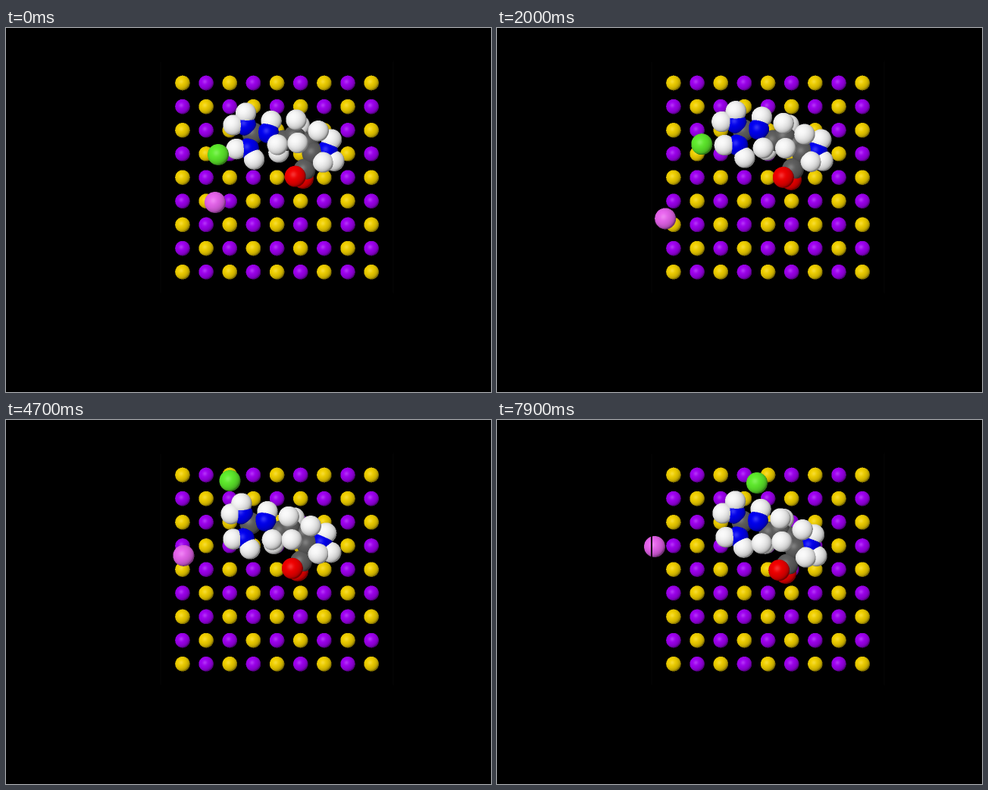
Animation, 640 px wide and 480 px high, one loop 8000 ms. Source, as a matplotlib script:

```python
import numpy as np
import matplotlib.pyplot as plt
from matplotlib.animation import FuncAnimation

W, H, SS = 640, 480, 2
FRAMES, STEP = 80, 100
LEFT, TOP, RIGHT, BOTTOM = 203, 43, 510, 349    # periodic cell
BOND = 16

COLORS = {
    "H": (255, 255, 255), "C": (98, 98, 98), "N": (0, 0, 250),
    "O": (250, 0, 0), "Cl": (98, 245, 46), "Na": (240, 104, 246),
    "gold": (250, 216, 0), "purple": (165, 0, 250),
}
RADIUS = {"H": 13.7, "C": 14.5, "gold": 9.8, "purple": 9.8}

LIGHT = np.array([-1, -1, 2.5]) / np.sqrt(8.25)
HALF = LIGHT + [0, 0, 1]
HALF = HALF / np.linalg.norm(HALF)

# Heavy atoms: name -> x, y, depth; the first letter is the element
HEAVY = {
    "N1": (314, 125, 0), "C1": (324, 136, -7), "N2": (344, 135, 0),
    "N3": (318, 156, 0), "C2": (363, 148, -4), "C3": (377, 143, -2),
    "C4": (394, 152, -6), "C5": (401, 166, 0), "N4": (420, 163, -2),
    "C6": (390, 188, 0), "O1": (378, 196, 12), "O2": (388, 199, -6),
}
# Hydrogens on each heavy atom: bond angle in degrees, depth
HYDROGENS = {
    "N1": [(-88, 3), (180, 3)], "N2": [(-75, -4)],
    "N3": [(178, 3), (62, 4)], "C2": [(132, 14), (112, -8)],
    "C3": [(-90, 10), (-65, -10)], "C4": [(160, 15), (-40, 7)],
    "N4": [(-70, -3), (56, 0), (110, 9)],
}

# Key poses: how far the head, the chain hydrogens and the tail have drifted
KEYS = np.array([0, 1300, 2800, 3900, 5500, 6600, 7900])
HEAD = np.array([(2, 3), (-1, -3), (1, 2), (-3, -1), (-2, 0), (2, 3), (0, -2)])
CHAIN = np.array([(6, -6), (2, -3), (-1, 3), (-6, 1), (1, -2), (1, 6), (-3, 3)])
TAIL = np.array([(4, -1), (1, -2), (1, 1), (-4, 0), (1, -1), (2, 1), (-7, 3)])

# Ion waypoints: time, x, y (chloride leaves through the top of the cell)
CL_PATH = np.array([
    (0, 280, 167), (1300, 253, 156), (2800, 290, 150), (3900, 290, 96),
    (5500, 301, 64), (6200, 345, 36), (6600, 361, 43), (7900, 343, 83)])
NA_PATH = np.array([
    (0, 276, 230), (1300, 225, 235), (1800, 214, 256), (2800, 255, 233),
    (3900, 276, 166), (4900, 224, 182), (5500, 278, 192), (6600, 270, 198),
    (7900, 208, 167)])


def build():
    """List every atom as element, place, depth and drift over the keys."""
    atoms = []
    for name, (x, y, z) in HEAVY.items():
        w = np.clip((x - 345) / 40, 0, 1)
        drift = (1 - w) * HEAD + w * TAIL
        atoms.append((name[0], x, y, z, drift))
        for angle, hz in HYDROGENS.get(name, []):
            a = np.radians(angle)
            swings = name in ("C2", "C3", "C4") and hz > 0
            atoms.append(("H", x + BOND * np.cos(a), y + BOND * np.sin(a), hz,
                          CHAIN if swings else drift))
    return atoms


ATOMS = build()
rng = np.random.default_rng(4)
PHASE = rng.uniform(0, 2 * np.pi, (len(ATOMS), 2))
RATE = rng.uniform(0.008, 0.014, (len(ATOMS), 2))


def sphere(img, depth, kind, x, y, z):
    """Draw a lit ball into the colour and depth buffers."""
    r = RADIUS.get(kind, 14) * SS
    x, y, z = x * SS, y * SS, z * SS
    x0, x1 = max(int(x - r), 0), int(x + r) + 2
    y0, y1 = max(int(y - r), 0), int(y + r) + 2
    py, px = np.mgrid[y0:y1, x0:x1]
    nx, ny = (px + 0.5 - x) / r, (py + 0.5 - y) / r
    nz = np.sqrt(np.clip(1 - nx**2 - ny**2, 0, 1))
    height = z + nz * r
    zone = depth[y0:y1, x0:x1]
    show = (nx**2 + ny**2 < 1) & (height > zone)

    normal = np.stack([nx, ny, nz], -1)
    diffuse = np.sqrt(np.clip(normal @ LIGHT, 0, 1))
    shine = 0.2 * np.clip(normal @ HALF, 0, 1) ** 24
    color = np.array(COLORS[kind]) / 255 * (0.48 + 0.5 * diffuse)[..., None]
    color += (1 - color) * shine[..., None]
    zone[show] = height[show]
    img[y0:y1, x0:x1][show] = color[show]


def backdrop():
    img = np.zeros((H * SS, W * SS, 3), np.float32)
    depth = np.full((H * SS, W * SS), -1e6, np.float32)
    for row in range(9):
        for col in range(9):
            kind = "purple" if (row + col) % 2 else "gold"
            sphere(img, depth, kind, 233 + 31.15 * col, 72.5 + 31.15 * row, -150)
    return img, depth


BASE = backdrop()


def at(t, times, points):
    return np.array([np.interp(t, times, p) for p in points.T])


def swing(t):
    """Strength of the thermal wobble, at rest on each key pose."""
    k = np.clip(np.searchsorted(KEYS, t, "right") - 1, 0, len(KEYS) - 2)
    return 1.6 * np.sin(np.pi * (t - KEYS[k]) / (KEYS[k + 1] - KEYS[k]))


def render(t):
    img, depth = (a.copy() for a in BASE)
    wobble = swing(t) * np.sin(RATE * t + PHASE)
    for (kind, x, y, z, drift), shake in zip(ATOMS, wobble):
        dx, dy = at(t, KEYS, drift) + shake
        sphere(img, depth, kind, x + dx, y + dy, z)

    for kind, path in (("Cl", CL_PATH), ("Na", NA_PATH)):
        x, y = at(t, path[:, 0], path[:, 1:])
        if y < TOP + 2:
            y += BOTTOM + 1 - TOP
        sphere(img, depth, kind, x, y, 40)

    img = img.reshape(H, SS, W, SS, 3).mean((1, 3))
    for edge in (LEFT, RIGHT):
        img[TOP:BOTTOM + 1, edge:edge + 2] = 0.015
    for edge in (TOP, BOTTOM):
        img[edge:edge + 2, LEFT:RIGHT + 1] = 0
    return np.clip(img, 0, 1)


fig = plt.figure(figsize=(W / 100, H / 100), dpi=100, facecolor="black")
ax = fig.add_axes([0, 0, 1, 1])
ax.axis("off")
view = ax.imshow(render(0), extent=(0, W, H, 0), aspect="auto",
                 interpolation="nearest")


def update(i):
    view.set_data(render(i * STEP))
    return [view]


anim = FuncAnimation(fig, update, frames=FRAMES, interval=STEP,
                     repeat=True, repeat_delay=0, blit=False)
plt.show()
```
